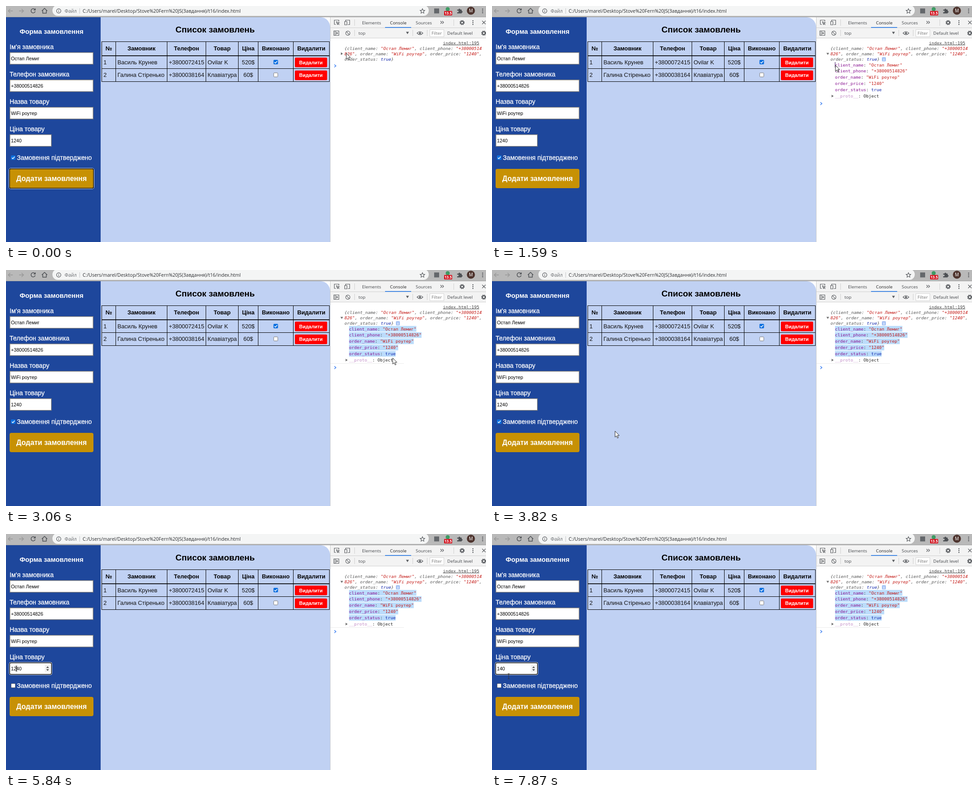
These frames come from a looping animation (1065x526 px, 8000 ms). An HTML page:

```html
<!DOCTYPE html>
<html lang="uk">
<head>
<meta charset="utf-8">
<title>Форма замовлення</title>
<style>
  html, body { margin: 0; width: 100%; height: 100%; overflow: hidden; background: #fff; }
  svg { display: block; width: 100vw; height: 100vh; }
  text { white-space: pre; }
  .page { font-family: "Liberation Sans", Arial, sans-serif; }
  .ui { font-family: "Open Sans", "Noto Sans", sans-serif; }
  .mono { font-family: "DejaVu Sans Mono", monospace; font-size: 9.55px; }
  .label { stroke: #fff; stroke-width: .3; }
  .b { font-weight: 700; }
  .mid { text-anchor: middle; }
  .it { font-style: italic; }
  .line { fill: none; stroke: #5a5d61; stroke-width: 1.2; }
</style>
</head>
<body>
<svg id="stage" viewBox="0 0 1065 526"></svg>
<script>
const LOOP = 8000;
const CHAR = 5.749;      // console character width
const LEFT = 761;        // left edge of the object rows
const ROW = 13.95;
const RED = '#c41a16', BLUE = '#0d22aa', PURPLE = '#881391', GREY = '#565656';

const NAME = 'Остап Лемиг', PHONE = '+38000514826', ITEM = 'WiFi роутер';

const rect = (x, y, w, h, fill, more = '') =>
  `<rect x="${x}" y="${y}" width="${w}" height="${h}" fill="${fill}" ${more}/>`;
const path = (d, more = 'class="line"') => `<path d="${d}" ${more}/>`;
const text = (x, y, str, size, fill, cls, more = '') =>
  `<text x="${x}" y="${y}" font-size="${size}" fill="${fill}" class="${cls}" ${more}>${str}</text>`;
const mono = (x, y, parts, cls = '') =>
  `<text x="${x}" y="${y}" class="mono ${cls}">` +
  parts.map(([s, c]) => `<tspan fill="${c}">${s}</tspan>`).join('') + '</text>';
const group = (id, body) => `<g id="${id}">${body}</g>`;
const dots = (x, y) => [-4, 0, 4].map(d => `<circle cx="${x}" cy="${y + d}" r="1.2" fill="#4d5054"/>`).join('');
const gear = (x, y) =>
  `<circle cx="${x}" cy="${y}" r="4.6" fill="none" stroke="#5a5d61" stroke-width="2" stroke-dasharray="2.2 1.41"/>` +
  `<circle cx="${x}" cy="${y}" r="3" fill="none" stroke="#5a5d61" stroke-width="2"/>`;
const box = (x, y) =>
  rect(x + .5, y + .5, 9, 9, '#fff', 'rx="1.5" stroke="#767676"');
const tick = (x, y) =>
  rect(x, y, 10, 10, '#0b6fdf', 'rx="1.7"') +
  path(`M${x + 2} ${y + 5.2}l2.2 2.2 4-4.6`, 'fill="none" stroke="#fff" stroke-width="1.5"');
// Dark ring with a thin white ring around it
const ring = (x, y, w, h, fill) =>
  rect(x - .9, y - .9, w + 1.8, h + 1.8, fill, 'rx="3.5" stroke="#fff"') +
  rect(x + .2, y + .2, w - .4, h - .4, 'none', 'rx="2.5" stroke="#101010" stroke-width="1.500"');

function browserBar() {
  return rect(0, 0, 1065, 25, '#b9b9b9') + rect(0, 24, 1065, 1, '#a2a2a2') +
    rect(103, -2, 835, 24, '#f4f5f5', 'rx="12"') +
    path('M15 11H5M9.5 6.5L5 11l4.5 4.5M29 11h10M34.5 6.5L39 11l-4.5 4.5', 'fill="none" stroke="#969696" stroke-width="1.3"') +
    path('M64.3 8.3A4.7 4.7 0 1 0 64.8 12M65 5.5V9H61.5', 'fill="none" stroke="#4d5054" stroke-width="1.5"') +
    path('M79.5 11L85.5 5.3 91.5 11M81.5 10V16H89.5V10', 'fill="none" stroke="#4d5054" stroke-width="1.5"') +
    '<circle cx="117" cy="11" r="4.8" class="line"/>' + path('M117 10.3V13.8M117 8V9.2') +
    text(130, 14.5, 'Файл', 10.5, '#66696d', 'ui') + rect(163, 5, 1, 12, '#c4c6c8') +
    text(170, 14.5, 'C:/Users/marel/Desktop/Stove%20Fern%20JS(Завдання)/t16/index.html', 10.5, '#2b2d30', 'ui') +
    path('M924 6l1.5 3.4 3.7.4-2.8 2.5.8 3.7-3.2-1.9-3.2 1.9.8-3.7-2.8-2.5 3.7-.4z') +
    rect(950, 5.5, 11, 11, '#64676b') +
    '<circle cx="980" cy="7" r="4.5" fill="#3e9a63"/>' +
    rect(972, 11, 18, 10, '#d3131f', 'rx="1.5"') +
    text(981, 19.3, '13.5', 8, '#fff', 'ui mid b') +
    path('M1001 8h3a2 2 0 1 1 4 0h3v3a2 2 0 1 1 0 4v1.5h-10v-3a2 2 0 1 0 0-3z', 'fill="#4d5054"') +
    '<circle cx="1031.5" cy="10.5" r="9" fill="#4e342e"/>' +
    text(1031.5, 14.2, 'M', 10, '#fff', 'ui mid') + dots(1057.5, 11);
}

function form() {
  const fields = [["Ім'я замовника", NAME], ['Телефон замовника', PHONE], ['Назва товару', ITEM], ['Ціна товару', '']];
  return rect(0, 25, 211, 501, '#1e479c') +
    text(101, 62, 'Форма замовлення', 14.8, '#fff', 'page b mid') +
    fields.map(([label, value], i) => {
      const y = 103 + 61 * i;
      return text(8, y - 7, label, 14.2, '#fff', 'page label') +
        rect(8.7, y + .7, i < 3 ? 184.6 : 92, 26.1, '#fff', 'stroke="#7b7b7b" stroke-width="1.4"') +
        text(11, y + 18, value, 10.65, '#000', 'page');
    }).join('') +
    group('priceFocus', ring(8, 287, 93, 26, '#fff')) +
    group('spinner', rect(86, 291, 12, 18, '#f1f1f1') +
      path('M89.2 298.5L92.3 295 95.4 298.5zM89.2 301.5L92.3 305 95.4 301.5z', 'fill="#4a4a4a"')) +
    text(11, 304, '<tspan id="price">1240</tspan>', 10.65, '#000', 'page') +
    rect(0, 294, 1, 12, '#000', 'id="caret"') +
    box(11, 333) + group('confirm', tick(11, 333)) +
    text(24, 343, 'Замовення підтверджено', 14.2, '#fff', 'page label') +
    rect(8, 363, 186, 43, '#c79104', 'rx="4"') +
    group('addFocus', ring(7.6, 362.6, 186.8, 43.8, 'none')) +
    text(101, 389.5, 'Додати замовлення', 15.9, '#fff', 'page b mid');
}

function orders() {
  const cols = [212.5, 243.5, 357.5, 443.5, 515.5, 559.5, 637.5, 717.5];
  const heads = ['№', 'Замовник', 'Телефон', 'Товар', 'Ціна', 'Виконано', 'Видалити'];
  const rows = [
    ['1', 'Василь Крунев', '+3800072415', 'Ovilar K', '520$'],
    ['2', 'Галина Стіренько', '+3800038164', 'Клавіатура', '60$']];
  const centre = i => (cols[i] + cols[i + 1]) / 2;
  return path('M210 25H697.700A21.300 21.300 0 0 1 719 46.300V526H210z', 'fill="#c0d1f3"') +
    text(464, 59, 'Список замовлень', 19, '#000', 'page b mid') +
    path(cols.map(x => `M${x} 79V169`).join('') + 'M212 79.5H718M212 139.5H718M212 168.5H718', 'stroke="#000" fill="none"') +
    rect(212, 110, 506, 1.7, '#000') +
    heads.map((h, i) => text(centre(i), 99.3, h, 12.8, '#000', 'page b mid')).join('') +
    rows.map((cells, r) => {
      const y = 129.5 + 28.7 * r;
      return cells.map((c, i) => i < 4
        ? text(cols[i] + 3.7, y, c, 12.8, '#111', 'page')
        : text(centre(i), y, c, 12.8, '#111', 'page mid')).join('') +
        (r ? box : tick)(593.5, 120 + 28.5 * r) +
        rect(641, 115 + 28.7 * r, 71.5, 21.5, '#f00', 'rx="2"') +
        text(676.5, y, 'Видалити', 10.65, '#fff', 'page b mid');
    }).join('');
}

function devtools() {
  const label = (x, y, s, c = '#45484c') => text(x, y, s, 9.8, c, 'ui');
  const divider = (x, y) => rect(x, y, 1, 14, '#cfcfcf');
  return rect(720, 25, 345, 46, '#f3f3f3') + rect(719, 25, 1, 501, '#c9cbcd') +
    rect(720, 48, 345, 1, '#cfcfcf') + rect(720, 71, 345, 1, '#cfcfcf') +
    path('M732 41H728.5V31.5H738.5V35M733 35l6.5 2.5-2.8 1-1.2 2.8zM736.5 39l3 3') +
    path('M753.5 34V31.5H762.5V41.5H758.5M751.5 34.5H756.5V42H751.5z') +
    divider(773, 30) + divider(773, 53) +
    label(790, 40.5, 'Elements') + label(852, 40.5, 'Console', '#222') + label(909, 40.5, 'Sources') +
    path('M964 33.5l3 3-3 3M968 33.5l3 3-3 3') + rect(841, 47, 58, 1.5, '#1a73e8') +
    divider(993, 30) + gear(1012, 37) + dots(1036, 37) +
    path('M1056.5 33l7.5 7.5M1064 33l-7.5 7.5') +
    path('M727.5 55.5H738.5V65.5H727.5zM730.5 55.5V65.5M733.5 58.5V62.5L736 60.5z') +
    '<circle cx="758.5" cy="60.5" r="4.7" class="line"/>' + path('M755.2 57.2l6.6 6.6') +
    label(782, 64, 'top') + path('M887.5 57.5H894L890.8 62.8z', 'fill="#5a5d61"') +
    divider(902, 53) + divider(934, 53) +
    path('M912 60.5Q918.5 53.5 925 60.5Q918.5 67.5 912 60.5z') + '<circle cx="918.5" cy="60.5" r="2.2" fill="#5a5d61"/>' +
    rect(940.5, 52.5, 31, 16, '#fff', 'stroke="#d5d5d5"') +
    label(944, 64, 'Filter', '#757575') + label(979, 64, 'Default level') + gear(1060, 60.5);
}

// Rows of the opened object: [key, value, value colour]
const props = [
  ['client_name', `"${NAME}"`, RED], ['client_phone', `"${PHONE}"`, RED], ['order_name', `"${ITEM}"`, RED],
  ['order_price', '"1240"', RED], ['order_status', 'true', BLUE], ['__proto__', 'Object', '#222']];
const lengths = props.map(([k, v]) => k.length + 2 + v.length);

function log() {
  const cut = PHONE.length - 3;
  const key = s => [s, GREY], str = s => [s, RED];
  const mark = (i, fill, more) => rect(LEFT, 124.7 + ROW * i, 0, 12.6, fill, more);
  return text(1050, 85.5, 'index.html:195', 9.55, '#454545', 'mono', 'text-anchor="end" text-decoration="underline"') +
    mono(751, 97.5, [key('{client_name: '), str(`"${NAME}"`), key(', client_phone: '), str('"' + PHONE.slice(0, cut))], 'it') +
    mono(751, 109.5, [str(PHONE.slice(cut) + '"'), key(', order_name: '), str(`"${ITEM}"`), key(', order_price: '), str('"1240"'), key(',')], 'it') +
    mono(751, 121.5, [key('order_status: '), ['true', BLUE], key('}')], 'it') +
    path('M743 103.3V109.3L747.5 106.3z', 'id="closed" fill="#6e6e6e"') +
    group('opened',
      path('M742 104.5H748L745 109z', 'fill="#6e6e6e"') +
      rect(865, 114, 9, 9.5, '#a9c5f5', 'rx="2"') +
      text(869.5, 121.5, 'i', 8, '#fff', 'page b mid') +
      props.map((_, i) => mark(i, '#bbdcfb', 'class="sel"')).join('') +
      mark(5, '#d8eafc', 'id="selPale"') +
      rect(LEFT - .3, 125, 1.4, 12, '#6b4a86', 'id="selStart"') +
      props.map(([k, v, c], i) => mono(LEFT, 134.5 + ROW * i,
        [[k, i < 5 ? PURPLE : '#c08ac5'], [': ', '#333'], [v, c]])).join('') +
      path('M753.5 197.7V203.7L758 200.7z', 'fill="#6e6e6e"')) +
    rect(720, 208, 163, 1, '#ececec', 'id="rule"') +
    path('M728.5 130.5l3.5 3-3.5 3', 'id="prompt" fill="none" stroke="#367cf1" stroke-width="1.5"');
}

const pointers =
  group('arrow', path('M0 0V13.5L3.1 10.7 5.3 15.7 7.4 14.8 5.2 9.9H9.4z', 'fill="#fff" stroke="#111" stroke-width=".9"')) +
  group('beam', path('M-2 -6Q0 -6 0 -5Q0 -6 2 -6M0 -5V5M-2 6Q0 6 0 5Q0 6 2 6', 'fill="none" stroke="#333" stroke-width="1"'));

document.getElementById('stage').innerHTML =
  rect(0, 0, 1065, 526, '#fff') + form() + orders() + devtools() + log() + browserBar() + pointers;

// Pointer path: time, x, y; each position holds until the next
const track = [
  [0, 755, 105], [150, 752, 105], [300, 747, 104], [440, 744, 105], [730, 748, 112], [870, 755, 122],
  [1010, 760, 129], [1160, 762, 132], [1740, 778, 148], [1880, 804, 164], [2030, 832, 183],
  [2170, 853, 194], [2320, 859, 195], [2470, 867, 193], [2620, 871, 191], [2780, 872, 190],
  [3060, 858, 196], [3220, 780, 225], [3370, 645, 277], [3520, 500, 322], [3670, 370, 349],
  [3820, 273, 359], [3980, 108, 357], [4130, 68, 351], [4270, 42, 344], [4410, 27, 338],
  [4560, 21, 335], [5130, 21, 305], [5260, 22, 303], [5410, 23, 301], [5700, 23, 300], [7870, 37, 317]];

// Price field: time, value, caret x (0 hides it)
const typing = [
  [0, '1240', 0], [5410, '1240', 23], [6270, '1240', 0], [6420, '140', 17],
  [6710, '40', 11], [7290, '40', 0], [7440, '140', 17], [7870, '140', 0]];

const at = (table, t) => table.findLast(step => step[0] <= t);
const el = id => document.getElementById(id);
const show = (id, on) => el(id).setAttribute('visibility', on ? 'visible' : 'hidden');
const bars = document.querySelectorAll('.sel');

function select(t) {
  const [, x, y] = at(track, Math.min(t, 2780));
  const last = Math.floor((y - 124) / ROW);
  const cols = Math.round((x - LEFT) / CHAR);
  const widths = lengths.map((n, i) =>
    t < 1740 || i > last ? 0 : (i < last ? n : Math.min(n, cols)) * CHAR);
  bars.forEach((bar, i) => bar.setAttribute('width', widths[i]));
  el('selPale').setAttribute('width', Math.min(widths[5], 9 * CHAR));
}

function draw(t) {
  const open = t >= 580;
  show('closed', !open);
  show('opened', open);
  show('selStart', t >= 1310 && t < 1740);
  show('rule', t >= 2470);
  el('prompt').setAttribute('transform', `translate(0 ${open ? 84 : 0})`);
  select(t);

  show('addFocus', t < 440);
  show('confirm', t < 4700);
  show('spinner', t >= 5130);
  show('priceFocus', t >= 5410);
  const [, value, caret] = at(typing, t);
  el('price').textContent = value;
  el('caret').setAttribute('x', caret);
  show('caret', caret > 0);

  const [, x, y] = at(track, t);
  const beam = t >= 5130;
  show('arrow', !beam);
  show('beam', beam);
  el(beam ? 'beam' : 'arrow').setAttribute('transform', `translate(${x} ${y})`);
}

function frame() {
  draw(performance.now() % LOOP);
  requestAnimationFrame(frame);
}
frame();
</script>
</body>
</html>
```
